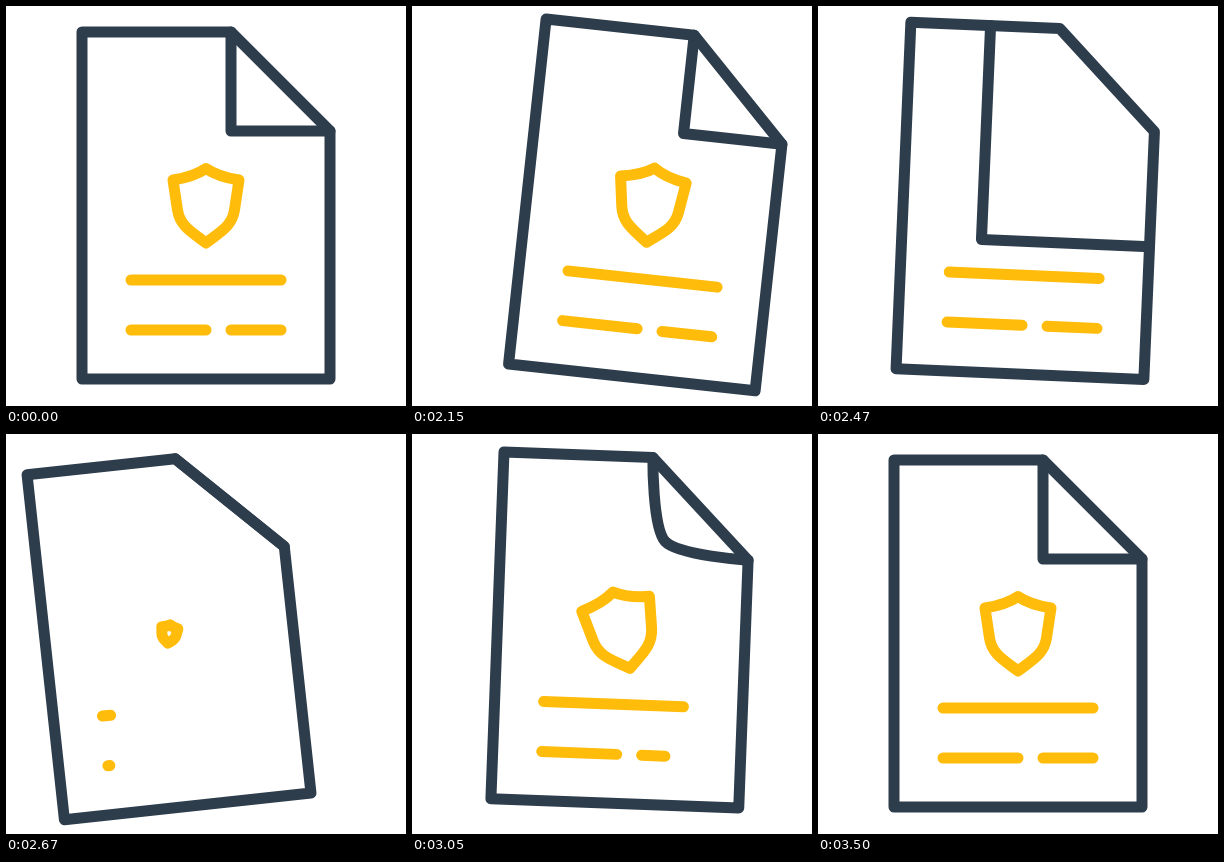
Recreate the animation shown at these times as an HTML page with a canvas. Size 400x400 px, loop 3520 ms.

```html
<!DOCTYPE html>
<html lang="en">
<head>
<meta charset="utf-8">
<title>Secure document</title>
<style>
  html, body { margin: 0; height: 100%; overflow: hidden; background: #fff; }
  canvas { display: block; width: 100vw; height: 100vh; }
</style>
</head>
<body>
<canvas id="stage" width="400" height="400"></canvas>
<script>
const ctx = document.getElementById('stage').getContext('2d');
const LOOP = 3520, DARK = '#2e3d4c', GOLD = '#ffbc0a';
const CX = 200, CY = 199.5;

// Page edges and the cut corner
const L = 76, T = 26, R = 324, B = 373, CUT_X = 225, CUT_Y = 125;

// Keys are [time, value] pairs
const moveX = [[2000, 0], [2240, 56], [2706, -38.5], [3160, 17.5], [3500, 0]];
const moveY = [[2000, 0], [2240, -0.8], [2450, -4.8], [2740, 1.3], [2930, 1.3], [3190, -9.5], [3400, 0]];
const tilt = [[2000, 0], [2242, 9.1], [2780, -8], [3140, 4], [3500, 0]];
const turn = [[2290, 0], [2670, 1]];
const refold = [[2800, 0], [3200, 1]];
const shieldScale = [[2570, 0], [2900, 1.1], [3200, 1]];
const shieldTilt = [[2570, 18], [3020, -15], [3350, 0]];
const upperLine = [[2594, 0], [3137, 1]];
const lowerLine = [[2625, 0], [3232, 1]];

const rad = deg => deg * Math.PI / 180;

function at(keys, t) {
  if (t <= keys[0][0]) return keys[0][1];
  for (let i = 1; i < keys.length; i++) {
    const [t0, a] = keys[i - 1], [t1, b] = keys[i];
    if (t < t1) {
      const u = (t - t0) / (t1 - t0);
      return a + (b - a) * u * u * (3 - 2 * u);
    }
  }
  return keys[keys.length - 1][1];
}

function trace(...points) {
  ctx.beginPath();
  points.forEach(([x, y]) => ctx.lineTo(x, y));
}

function stroke(color) {
  ctx.strokeStyle = color;
  ctx.stroke();
}

function bar(x, y, length) {
  if (length <= 0) return;
  trace([x, y], [x + length, y]);
  stroke(GOLD);
}

function shield(scale, angle) {
  if (scale <= 0) return;
  ctx.save();
  ctx.translate(CX, CY);
  ctx.rotate(rad(angle));
  ctx.scale(scale, scale);
  ctx.beginPath();
  ctx.moveTo(0, -37);
  ctx.bezierCurveTo(-8, -31.5, -20, -27.5, -33, -25.5);
  ctx.lineTo(-28.5, 4.5);
  ctx.bezierCurveTo(-26, 20.5, -15, 26, 0, 37.5);
  ctx.bezierCurveTo(15, 26, 26, 20.5, 28.5, 4.5);
  ctx.lineTo(33, -25.5);
  ctx.bezierCurveTo(20, -27.5, 8, -31.5, 0, -37);
  ctx.closePath();
  ctx.restore(); // keeps the line weight constant
  stroke(GOLD);
}

function content(scale, angle, upper, lower) {
  shield(scale, angle);
  bar(125, 274, 150 * upper);
  bar(125, 324, Math.min(75, 125 * lower));
  bar(225, 324, 125 * lower - 75);
}

function flap(p) {
  const x = CUT_X + (L - CUT_X) * p, y = CUT_Y + (B - CUT_Y) * p;
  trace([x, T], [x, y], [R, y], [R, CUT_Y], [CUT_X, T]);
  ctx.fillStyle = '#fff';
  ctx.fill();
  trace([x, T], [x, y], [R, y]);
  stroke(DARK);
}

function newFold(p) {
  const x = 274.5 - 49.5 * p, y = 75.5 + 49.5 * p, k = 43 * (1 - p);
  ctx.beginPath();
  ctx.moveTo(CUT_X, T);
  ctx.bezierCurveTo(CUT_X, T, x - k, y - k, x, y);
  ctx.bezierCurveTo(x + k, y + k, R, CUT_Y, R, CUT_Y);
  stroke(DARK);
}

function draw(t) {
  ctx.clearRect(0, 0, 400, 400);
  ctx.save();
  ctx.translate(CX + at(moveX, t), CY + at(moveY, t));
  ctx.rotate(rad(at(tilt, t)));
  ctx.translate(-CX, -CY);
  ctx.lineWidth = 11;
  ctx.lineCap = ctx.lineJoin = 'round';

  if (t < 2670) {
    content(1, 0, 1, 1);
    flap(at(turn, t));
  } else {
    newFold(at(refold, t));
  }
  if (t > 2570) {
    content(at(shieldScale, t), at(shieldTilt, t), at(upperLine, t), at(lowerLine, t));
  }

  trace([L, T], [CUT_X, T], [R, CUT_Y], [R, B], [L, B]);
  ctx.closePath();
  stroke(DARK);
  ctx.restore();
}

const start = performance.now();
function tick() {
  draw((performance.now() - start) % LOOP);
  requestAnimationFrame(tick);
}
tick();
</script>
</body>
</html>
```
